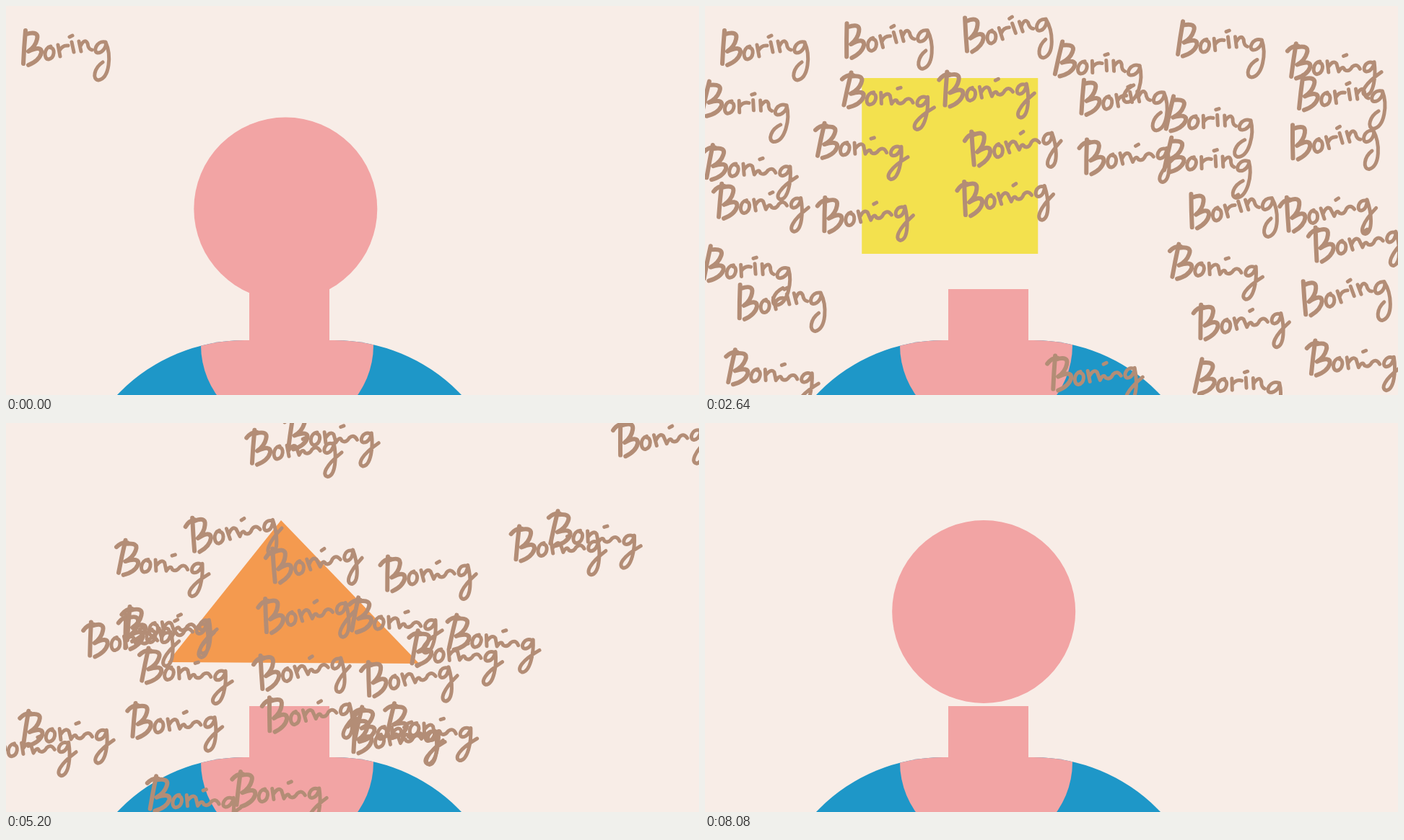
These frames come from a looping animation (960 px wide and 540 px high, 8160 ms). An HTML page with a canvas:

```html
<!DOCTYPE html>
<html lang="en">
<head>
<meta charset="utf-8">
<title>Boring</title>
<style>
html, body { margin: 0; width: 100%; height: 100%; overflow: hidden; background: #f8ede7; }
canvas { display: block; }
</style>
</head>
<body>
<canvas id="stage" width="960" height="540"></canvas>
<script>
const ctx = document.getElementById('stage').getContext('2d');
const STEP = 80, FRAMES = 102;
const PAPER = '#f8ede7', PINK = '#f2a4a4', BLUE = '#1e97c8', INK = '#b38d76';

// Each head rests at x, y; arrive and leave are frames, the rates speed those moves up
const circle = {
  x: 391, y: 262, arrive: -17, inRate: 1, leave: 17.1, outRate: 1, dip: 169, color: PINK,
  trace: () => ctx.arc(0, 0, 127, 0, 7)
};
const square = {
  x: 386, y: 219, arrive: 25.7, inRate: 1, leave: 43, outRate: 1.3, dip: 135, color: '#f3e14e',
  trace: () => ctx.rect(-122, -122, 244, 244)
};
const triangle = {
  x: 381, y: 135, arrive: 44.75, inRate: 2, leave: 77.2, outRate: 1, dip: 169, color: '#f49a4f',
  trace() {
    ctx.moveTo(0, 0);
    ctx.lineTo(-157, 197);
    ctx.lineTo(191.5, 199);
  }
};

// Swings in from the lower left, bobs once on the neck, then drops away to the right
function drawHead(head, f) {
  const v = (f - head.arrive) * head.inRate;
  const u = Math.max(0, f - head.leave) * head.outRate;
  const near = 0.77 ** v;
  const bob = v > 9 && v < 23 ? 45 * Math.sin(Math.PI * (v - 16) / 7) : 0;
  const t = Math.min(1, u / 14);
  const x = head.x - 315 * near + 430 * t * t * (3 - 2 * t);
  const y = head.y + head.dip * near ** 2 + bob + 26 * (u / 8) ** 4;
  if (y > 700) return;
  ctx.save();
  ctx.translate(x, y);
  ctx.fillStyle = head.color;
  ctx.beginPath();
  head.trace();
  ctx.fill();
  ctx.restore();
}

function drawBody() {
  ctx.fillStyle = PINK;
  ctx.fillRect(337, 393, 111, 72);
  ctx.save();
  ctx.beginPath();
  ctx.roundRect(88, 464, 609, 500, 242);
  ctx.clip();
  ctx.fillStyle = BLUE;
  ctx.fillRect(88, 464, 609, 76);
  ctx.fillStyle = PINK;
  ctx.beginPath();
  ctx.arc(389.5, 471, 119.5, 0, 7);
  ctx.fill();
  ctx.restore();
}

// Handwriting: a heavy capital, then upright or joined small letters
const capital = new Path2D('M5 2Q3 25 2 48M6 7Q24 2 21 14Q19 24 9 31Q28 22 27 33Q24 44 9 50');
const flag = new Path2D('M-6 13Q0 5 8 5');
const roundO = 'M40 24C30 26 30 42 37 42C46 40 46 26 40 26';
const upright = new Path2D(roundO +
  'M50 22L53 38M52 30Q56 22 64 23M69 18L72 32M66 11L70 9M79 17L82 31M81 24Q87 12 91 20Q92 28 97 29' +
  'M115 18C103 16 98 32 105 33C112 33 118 24 116 18C124 36 122 68 106 71C97 70 100 54 112 46');
const joined = new Path2D(roundO +
  'M50 23L53 38M52 31Q58 20 63 25L67 36Q72 26 75 33Q81 36 85 28Q91 22 96 30M72 14L76 12' +
  'M113 20C103 17 98 32 105 33C111 33 115 25 115 19C119 38 118 64 107 66C98 64 104 50 126 32');

const wobble = n => Math.sin(n * n * 1.7 + n);
const fract = n => n - Math.floor(n);

// A loose grid fills up around the face first, then over it, then in the gaps
function layWords() {
  const grid = [];
  for (let i = 0; i < 42; i++) {
    grid.push({
      x: 22 + 160 * (i % 6) + 22 * wobble(i),
      y: 32 + 73 * Math.floor(i / 6) + 18 * wobble(i * 3)
    });
  }
  const overFace = p => Math.hypot(p.x - 330, p.y - 290) < 240;
  grid.sort((a, b) => overFace(a) - overFace(b));
  for (let k = 1; k <= 14; k++) {
    grid.push({ x: 960 * fract(k * 0.618) - 60, y: 545 * fract(k * 0.755) - 25 });
  }
  return grid.map((p, i) => ({
    ...p,
    angle: 0.16 * wobble(i * 5),
    letters: fract(i * 0.618) < i / 30 ? joined : upright
  }));
}
const words = layWords();

function drawWord({ x, y, angle, letters }, i) {
  ctx.save();
  ctx.translate(x, y);
  ctx.rotate(angle);
  ctx.lineWidth = 6;
  ctx.stroke(capital);
  if (letters === joined) ctx.stroke(flag);
  ctx.lineWidth = 5;
  ctx.stroke(letters);
  ctx.restore();
}

function draw() {
  const f = Math.floor(performance.now() / STEP) % FRAMES;
  ctx.fillStyle = PAPER;
  ctx.fillRect(0, 0, 960, 540);

  drawHead(circle, f > 60 ? f - FRAMES : f);
  drawHead(square, f);
  drawHead(triangle, f);
  drawBody();

  // One word is added per frame; later the oldest go first, four at a time
  ctx.strokeStyle = INK;
  ctx.lineCap = ctx.lineJoin = 'round';
  const gone = Math.max(0, f - 58) * 4;
  words.slice(gone, Math.max(1, f)).forEach(drawWord);
  requestAnimationFrame(draw);
}
draw();
</script>
</body>
</html>
```
